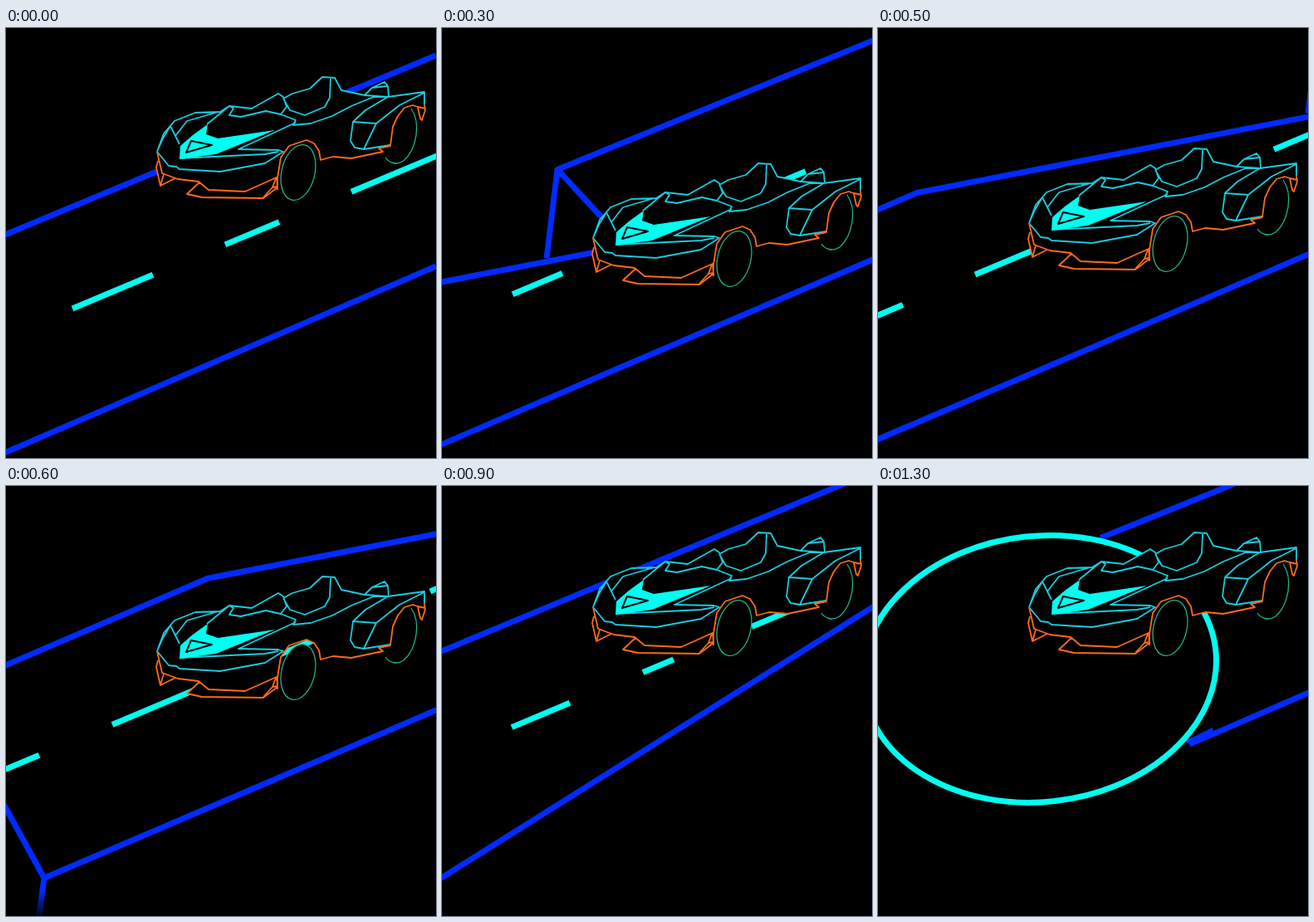
An HTML page with a canvas that plays this animation: 518x518 px, repeating every 1400 ms.

```html
<!DOCTYPE html>
<html lang="en">
<head>
<meta charset="utf-8">
<title>Neon road</title>
<style>
html, body { margin: 0; width: 100%; height: 100%; overflow: hidden; background: #000; }
canvas { display: block; width: 100vw; height: 100vh; }
</style>
</head>
<body>
<canvas id="stage" width="518" height="518"></canvas>
<script>
const SIZE = 518, STEP = 100, STEPS = 14;
const ROAD_DX = 196, ROAD_DY = -87.2;
const BLUE = '#002bff', CYAN = '#00fff0', BODY = '#1ccadc', TRIM = '#ff6a1c', WHEEL = '#1fb488';
const ctx = document.getElementById('stage').getContext('2d');

// Height of the car at each step
const carY = [0, 44, 83, 104, 108, 86, 50, 16, -2, -3, -3, -3, -3, -3];

// Road edges in road coordinates, which slide up and to the right
const edges = new Path2D(`
  M-462 539 L-449 432 L0 248.5 L518 33
  M-449 432 L-364 524 L-933 634.5 L-1176 739 L-1764 983.5 L-2156 1146.2 L-2280 1196
  M518 287 L0 511 L-392 678.6 L-784 847.5 L-1130 995.5 L-1186 893.5
  L-1823 1293.5 L-2156 1437.5 L-2173 1444.5`);
const edgeTips = new Path2D(`
  M-2178 1440.6 L-2145 1424.6 L-2144 1428.6 L-2170 1447.6 Z
  M-2283 1196.6 L-2268 1187.6 L-2258 1187.6 L-2276 1197.6 Z`);

// Start and end of each lane mark along the road
const marks = [
  [416, 540], [264, 329], [80, 177], [-63, -7], [-235, -150], [-355, -322],
  [-503, -443], [-665, -590], [-863, -752], [-1048, -950], [-1233, -1136],
  [-1391, -1320], [-1522, -1485], [-1680, -1610], [-1847, -1766],
  [-2000, -1935], [-2148, -2088]
];
const markY = x => 371.5 - 0.419 * x;

const hull = new Path2D(`M182 149 L190 127 L203 112 L228 102 L258 101 L269 94 L296 97
  L328 79 L335 84 L345 79 L366 73 L381 59 L396 60 L404 75 L432 81 L441 72 L456 65 L461 83
  L504 77 L504 92 L490 93 L480 96 L472 106 L466 119 L463 142 L450 145 L454 149 L416 157
  L394 155 L379 159 L377 148 L371 139 L362 135 L341 142 L331 156 L327 181 L327 192
  L310 205 L236 204 L218 200 L232 185 L207 182 L186 190 L181 166 Z`);

const bodyLines = new Path2D(`
  M182 149 L190 127 L203 112 L228 102 L258 101 L269 94 L274 97 L269 105 L283 107 L313 100
  L331 104 L349 111 L346 117 L367 115 L393 106 L416 94 L443 83 L460 83
  M269 94 L296 97 L328 79 L334 83 L338 95 L331 104
  M334 85 L345 79 L366 73 L381 59 L396 60 L404 75 L432 81 L460 83 L504 77 L504 92
  M334 85 L342 99 L360 105 L384 95 L390 84 L391 60
  M432 81 L441 72 L456 65 L460 70 L461 83 M441 72 L460 70
  M460 83 L433 99 L418 113 L415 136 L420 144 L431 146 L463 141
  M418 113 L446 115 L474 93 L504 78 M446 115 L431 146
  M182 149 L196 166 L205 167 L209 170 L258 173 L312 163 L334 149 L328 147 L280 146 L349 114
  M209 157 L312 152 L328 149
  M182 149 L189 133 L198 118 L209 140 M203 112 L198 118
  M204 130 L218 112 L256 101 M242 116 L269 94`);

const lamp = new Path2D(`M209 158 L210 142 L225 129 L243 116 L241 128 L255 133
  L324 123 L253 152 Z`);
const lampCut = new Path2D('M217 150 L223 136 L248 141 Z');

const trimLines = new Path2D(`
  M182 149 L188 175 L207 182 L232 185 L244 195 L288 197 L326 180 L327 192 L310 205
  L236 204 L218 200 L233 186
  M183 160 L181 168 L186 190 L204 181 M186 190 L190 176
  M325 181 L321 192 L310 204 M321 192 L327 191
  M327 195 L327 181 L331 156 L341 142 L362 135 L371 139 L377 148 L379 159 L394 155
  L416 157 L454 149 L449 145 L463 142 L466 119 L472 106 L480 96 L490 93 L496 95
  L499 109 L501 111 L505 99 L504 92 M496 95 L505 97`);

const frontWheel = new Path2D();
frontWheel.ellipse(352, 174, 20, 34, 0.23, 0, Math.PI * 2);
const rearWheel = new Path2D('M488 97 C500 114 495 146 479 160 C470 166 461 162 457 156');

function stroke(path, color, width) {
  ctx.strokeStyle = color;
  ctx.lineWidth = width;
  ctx.stroke(path);
}

function fill(path, color) {
  ctx.fillStyle = color;
  ctx.fill(path);
}

function drawRoad(n) {
  ctx.save();
  ctx.translate(ROAD_DX * n, ROAD_DY * n);
  stroke(edges, BLUE, 7);
  fill(edgeTips, BLUE);

  // Post that fades out below the road
  const fade = ctx.createLinearGradient(0, 1010, 0, 1046);
  fade.addColorStop(0, BLUE);
  fade.addColorStop(1, BLUE + '00');
  stroke(new Path2D('M-1130 995 L-1137 1048'), fade, 7);

  const lane = new Path2D();
  for (const [from, to] of marks) {
    lane.moveTo(from, markY(from));
    lane.lineTo(to, markY(to));
  }
  stroke(lane, CYAN, 7);

  const ring = new Path2D();
  ring.ellipse(-2353.5, 1354, 213.5, 160.3, -0.106, 0, Math.PI * 2);
  stroke(ring, CYAN, 7);
  ctx.restore();
}

function drawCar(y) {
  ctx.save();
  ctx.translate(0, y);
  fill(hull, '#000');
  fill(frontWheel, '#000');
  stroke(frontWheel, WHEEL, 1.3);
  stroke(rearWheel, WHEEL, 1.3);
  stroke(bodyLines, BODY, 1.8);
  fill(lamp, CYAN);
  stroke(lampCut, '#000', 2);
  stroke(trimLines, TRIM, 1.8);
  ctx.restore();
}

function draw(now) {
  const n = Math.floor(now / STEP) % STEPS;
  ctx.fillStyle = '#000';
  ctx.fillRect(0, 0, SIZE, SIZE);
  ctx.lineJoin = 'round';
  drawRoad(n);
  drawCar(carY[n]);
}

const start = performance.now();
function tick() {
  draw(performance.now() - start);
  requestAnimationFrame(tick);
}
tick();
</script>
</body>
</html>
```
